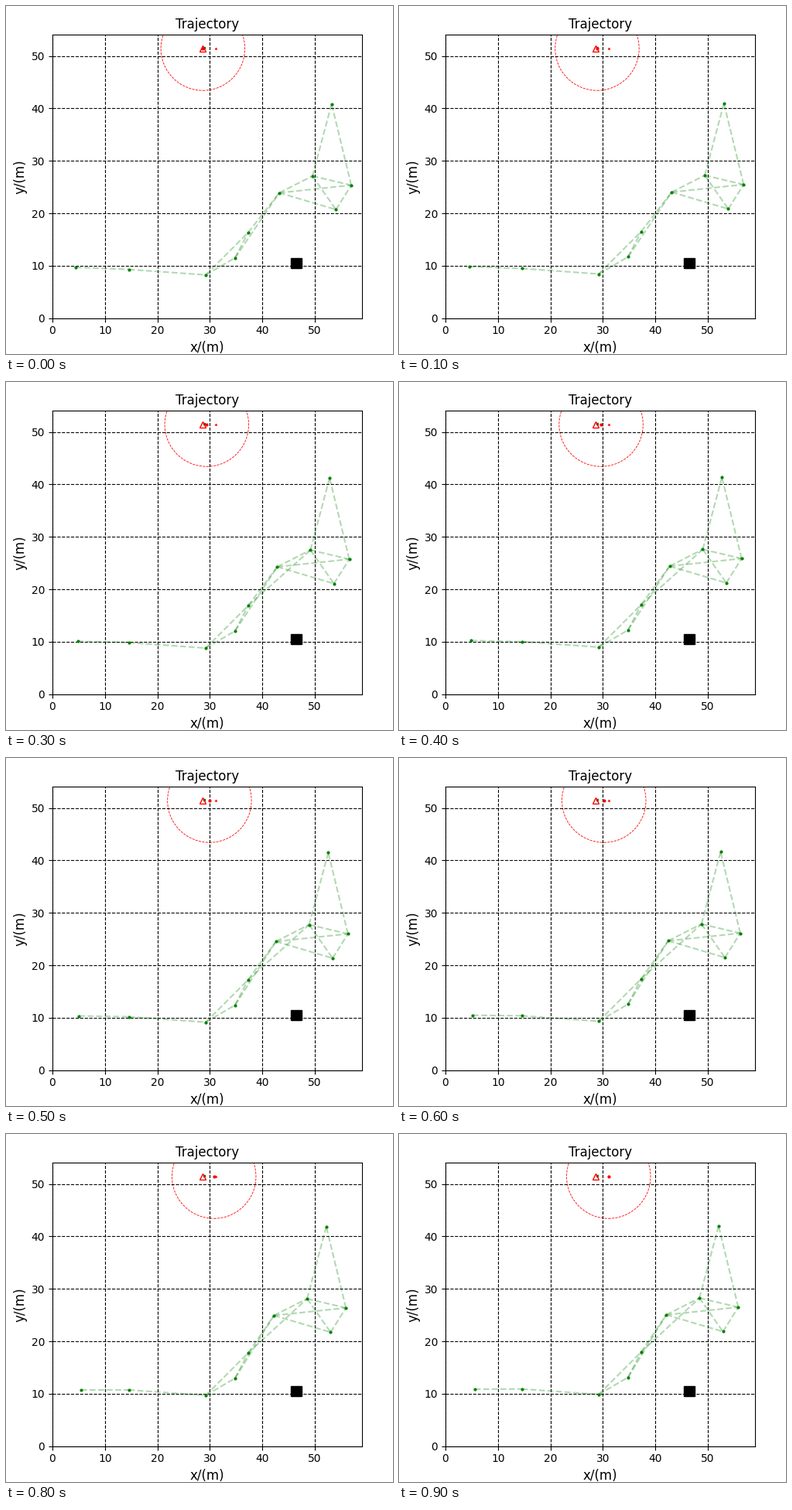
A matplotlib script for the animation above (1 s loop, 500x450 px).

```python
from itertools import combinations

import matplotlib.pyplot as plt
import numpy as np
from matplotlib.animation import FuncAnimation
from matplotlib.patches import Circle, Rectangle

WIDTH, HEIGHT, DPI = 500, 450, 100
FRAMES, INTERVAL = 10, 100
SPEED = 0.18        # agent step per frame
LINK_RANGE = 16
SENSE_RADIUS = 8
LEADER_START = (28.67, 51.42)
GOAL_X = 31.13

START = np.array([
    (4.43, 9.7), (14.57, 9.28), (29.22, 8.24), (34.8, 11.5), (37.3, 16.33),
    (43.23, 23.9), (49.55, 27.1), (54.03, 20.7), (56.95, 25.35), (53.2, 40.85),
])
# The first agent heads up-right, the middle ones up, the rest up-left.
ANGLES = np.radians([45] + [90] * 4 + [135] * 5)
STEP = SPEED * np.column_stack([np.cos(ANGLES), np.sin(ANGLES)])

fig = plt.figure(figsize=(WIDTH / DPI, HEIGHT / DPI), dpi=DPI, facecolor="white")
ax = fig.add_axes([60 / WIDTH, 46.4 / HEIGHT, 400 / WIDTH, 366.1 / HEIGHT])
ax.set(xlim=(0, 59), ylim=(0, 54))
ax.set_xticks(range(0, 51, 10))
ax.set_yticks(range(0, 51, 10))
ax.set_title("Trajectory", fontsize=12)
ax.set_xlabel("x/(m)", fontsize=12)
ax.set_ylabel("y/(m)", fontsize=12)
ax.grid(color="black", linestyle="--", linewidth=0.8)

ax.add_patch(Rectangle((45.5, 9.5), 2, 2, facecolor="black", edgecolor="black"))
sensor = ax.add_patch(Circle(LEADER_START, SENSE_RADIUS, fill=False,
                             edgecolor="red", linestyle="--", linewidth=0.6))

links = {pair: ax.plot([], [], "--", color="green", alpha=0.3, linewidth=1.5)[0]
         for pair in combinations(range(len(START)), 2)}
agents, = ax.plot([], [], "o", color="green", markersize=2)

x0, y0 = LEADER_START
ax.plot(x0 + 0.28, y0 + 0.08, "s", color="green", markersize=2)
ax.plot(x0, y0, "^", markersize=6, markerfacecolor="none", markeredgecolor="red")
ax.plot(GOAL_X, y0, "*", color="red", markersize=2.5, markeredgewidth=0.3)
leader, = ax.plot([], [], "o", color="red", markersize=2)


def update(k):
    points = START + k * STEP
    agents.set_data(points[:, 0], points[:, 1])
    for (i, j), line in links.items():
        line.set_data(points[[i, j], 0], points[[i, j], 1])
        line.set_visible(np.hypot(*(points[i] - points[j])) < LINK_RANGE)
    x = x0 + 0.23 * k + 0.0043 * k * k
    leader.set_data([x], [y0])
    sensor.center = (x, y0)
    return [agents, leader, sensor, *links.values()]


anim = FuncAnimation(fig, update, frames=FRAMES, interval=INTERVAL,
                     repeat=True, repeat_delay=0, blit=False)
plt.show()
```
